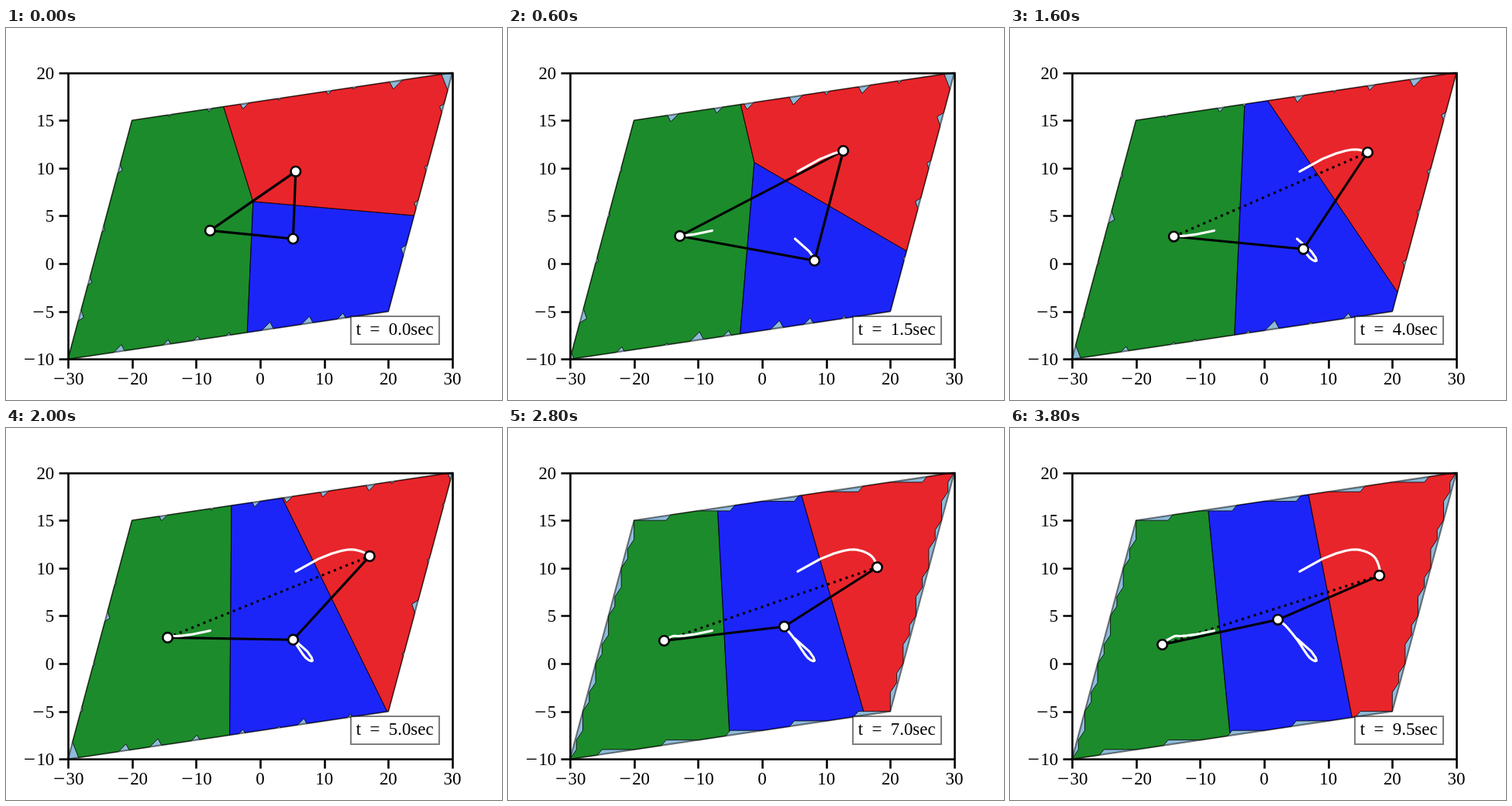
These frames come from a looping animation (640x480 px, 4000 ms). An HTML page with a canvas:

```html
<!DOCTYPE html>
<html lang="en">
<head>
<meta charset="utf-8">
<title>Three moving cells</title>
<style>
html, body { margin: 0; width: 100%; height: 100%; overflow: hidden; background: #fff; }
canvas { display: block; }
</style>
</head>
<body>
<canvas id="c" width="640" height="480"></canvas>
<script>
const ctx = document.getElementById('c').getContext('2d');
const STEP = 200, COUNT = 20, EM = 22.9;
const FONT = '"Liberation Serif", Tinos, serif';
const SX = 496 / 60, SY = 12.32;
const X = x => 328 + SX * x, Y = y => 304 - SY * y;
const toPixels = points => points.map(([x, y]) => [X(x), Y(y)]);
const crisp = v => Math.round(v) + 0.5;
const CORNERS = toPixels([[-30, -10], [-20, 15], [30, 20], [20, -5]]);
const [RED, BLUE, GREEN] = [0, 1, 2];
const COLORS = ['#ff0000', '#0000ff', '#008000'];

// step, then the x and y of the red, blue and green agents
const KEYS = [
  [0, 373.8, 185.1, 370.4, 272, 263.4, 261.4],
  [1, 403.2, 168.9, 388.6, 288.1, 239.2, 266.4],
  [3, 432.6, 158.5, 395.5, 300.2, 221.8, 268.4],
  [6, 451.6, 157.4, 386.5, 296.3, 214.4, 268.2],
  [10, 469.3, 165.4, 370.5, 273.2, 208.6, 270.4],
  [14, 476.4, 179.7, 356.5, 256.2, 201.5, 274.5],
  [19, 476.7, 190.4, 345.7, 247.3, 196.6, 279.5]
];

function random(seed) {
  let s = seed * 7919 + 17;
  return () => (s = (s * 16807) % 2147483647) / 2147483647;
}

function slope(i, j) {
  const a = KEYS[Math.max(i - 1, 0)], b = KEYS[Math.min(i + 1, KEYS.length - 1)];
  return (b[j] - a[j]) / (b[0] - a[0]);
}

// Smooth curve through the key points
function agentsAt(n) {
  const i = Math.min(KEYS.findLastIndex(k => k[0] <= n), KEYS.length - 2);
  const a = KEYS[i], b = KEYS[i + 1], h = b[0] - a[0], u = (n - a[0]) / h;
  const value = j => a[j] + u * u * (3 - 2 * u) * (b[j] - a[j]) +
    h * u * (1 - u) * ((1 - u) * slope(i, j) - u * slope(i + 1, j));
  return [1, 3, 5].map(j => [value(j), value(j + 1)]);
}
const PATH = Array.from({ length: COUNT }, (_, n) => agentsAt(n));

// Border with random triangular gaps and cut sharp corners
function notchedOutline(n) {
  const rnd = random(n + 1), points = [];
  const cuts = [20 * rnd(), 0, 16 * rnd(), 0];
  CORNERS.forEach((A, e) => {
    const next = (e + 1) % 4, B = CORNERS[next];
    const axis = e % 2 ? 0 : 1, dir = Math.sign(B[axis] - A[axis]);
    const length = Math.abs(B[axis] - A[axis]), count = e % 2 ? 7 : 4;
    const at = d => [0, 1].map(k => A[k] + d / length * (B[k] - A[k]));
    points.push(at(1.6 * cuts[e]));
    for (let i = 0; i < count; i++) {
      const start = 35 + (length - 70) * (i + 0.5 * rnd()) / count;
      const width = 4 + 14 * rnd() ** 2;
      const tip = at(start + 0.3 * width);
      tip[1 - axis] += (e < 2 ? 1 : -1) * width * (axis ? 0.42 : 0.6);
      points.push(at(start), tip, at(start + width));
    }
    points.push(at(length - cuts[next]));
  });
  return points;
}

// Border that follows the unit grid
function gridOutline() {
  const half = [[-30, -10]];
  for (let y = -9; y <= 15; y++) half.push([Math.ceil(0.4 * y - 26), y]);
  for (let y = 15; y < 20; y++) {
    const x = 10 * (y - 17);
    half.push([x, y], [x + 5, y], [x + 5.7, y + 0.57]);
  }
  return toPixels(half.concat(half.map(([x, y]) => [-x, 10 - y])));
}

// Keep the part of a polygon that is nearer to a than to b
function nearer(points, a, b) {
  const dist = (p, q) => ((p[0] - q[0]) / SX) ** 2 + ((p[1] - q[1]) / SY) ** 2;
  const side = p => dist(p, a) - dist(p, b);
  const out = [];
  points.forEach((p, i) => {
    const q = points[(i + 1) % points.length], sp = side(p), sq = side(q);
    if (sp <= 0) out.push(p);
    if (sp * sq < 0) {
      const u = sp / (sp - sq);
      out.push([p[0] + u * (q[0] - p[0]), p[1] + u * (q[1] - p[1])]);
    }
  });
  return out;
}

const CELLS = PATH.map((agents, n) => {
  const outline = n % 5 === 4 ? gridOutline() : notchedOutline(n);
  return agents.map(a => agents.filter(b => b !== a)
    .reduce((cell, b) => nearer(cell, a, b), outline));
});

function trace(points, close) {
  ctx.beginPath();
  points.forEach(p => ctx.lineTo(p[0], p[1]));
  if (close) ctx.closePath();
}

function stroke(color, width) {
  ctx.strokeStyle = color;
  ctx.lineWidth = width;
  ctx.stroke();
}

function label(value, right, base) {
  const digits = String(Math.abs(value));
  ctx.textAlign = 'right';
  ctx.font = `${EM}px ${FONT}`;
  ctx.fillText(digits, right, base);
  if (value < 0) {
    ctx.textAlign = 'center';
    ctx.font = `27px ${FONT}`;
    ctx.fillText('\u2212', right - EM * (digits.length / 2 + 0.39), base + 1.2);
  }
}

function drawAxes() {
  ctx.beginPath();
  ctx.rect(80.5, 58.5, 496, 369);
  ctx.fillStyle = '#000';
  for (let x = -30; x <= 30; x += 10) {
    ctx.moveTo(crisp(X(x)), 427.5);
    ctx.lineTo(crisp(X(x)), 439.5);
    const width = EM * (String(Math.abs(x)).length / 2 + (x < 0 ? 0.778 : 0));
    label(x, X(x) + width / 2, 460);
  }
  for (let y = -10; y <= 20; y += 5) {
    ctx.moveTo(80.5, crisp(Y(y)));
    ctx.lineTo(68.5, crisp(Y(y)));
    label(y, 62.3, Y(y) + 8);
  }
  stroke('#000', 2.6);
}

function drawClock(n) {
  ctx.beginPath();
  ctx.rect(445, 372, 114, 36);
  ctx.fillStyle = 'rgba(255,255,255,.5)';
  ctx.fill();
  stroke('rgba(0,0,0,.5)', 2.08);
  ctx.fillStyle = '#000';
  ctx.font = `${EM}px ${FONT}`;
  ctx.textAlign = 'left';
  ctx.wordSpacing = '5.6px';
  ctx.fillText(`t = ${(n / 2).toFixed(1)}sec`, 451.8, 396);
  ctx.wordSpacing = '0px';
}

function draw(n) {
  const agents = PATH[n];
  ctx.fillStyle = '#fff';
  ctx.fillRect(0, 0, 640, 480);
  ctx.lineJoin = 'round';

  trace(CORNERS, true);
  ctx.fillStyle = '#8fbbd9';
  ctx.fill();
  stroke('rgba(0,0,0,.5)', 2.08);

  ctx.globalAlpha = 0.8;
  for (const i of [GREEN, BLUE, RED]) {
    trace(CELLS[n][i], true);
    ctx.fillStyle = COLORS[i];
    ctx.fill();
    stroke('#000', 1);
  }
  ctx.globalAlpha = 1;

  // The green and red cells stop touching after 3 seconds
  for (const [i, j] of [[GREEN, BLUE], [BLUE, RED], [GREEN, RED]]) {
    const apart = n > 6 && i === GREEN && j === RED;
    ctx.setLineDash(apart ? [3.1, 5.15] : []);
    trace([agents[i], agents[j]]);
    stroke('#000', 3.1);
  }
  ctx.setLineDash([]);

  ctx.lineCap = 'round';
  agents.forEach((_, i) => {
    trace(PATH.slice(0, n + 1).map(p => p[i]));
    if (n) stroke('#fff', 3.1);
  });
  ctx.lineCap = 'butt';

  for (const [x, y] of agents) {
    ctx.beginPath();
    ctx.arc(x, y, 6.3, 0, 2 * Math.PI);
    ctx.fillStyle = '#fff';
    ctx.fill();
    stroke('#000', 2.6);
  }
  ctx.lineJoin = 'miter';
  drawAxes();
  drawClock(n);
}

function tick() {
  draw(Math.floor(performance.now() / STEP) % COUNT);
  requestAnimationFrame(tick);
}
tick();
</script>
</body>
</html>
```
